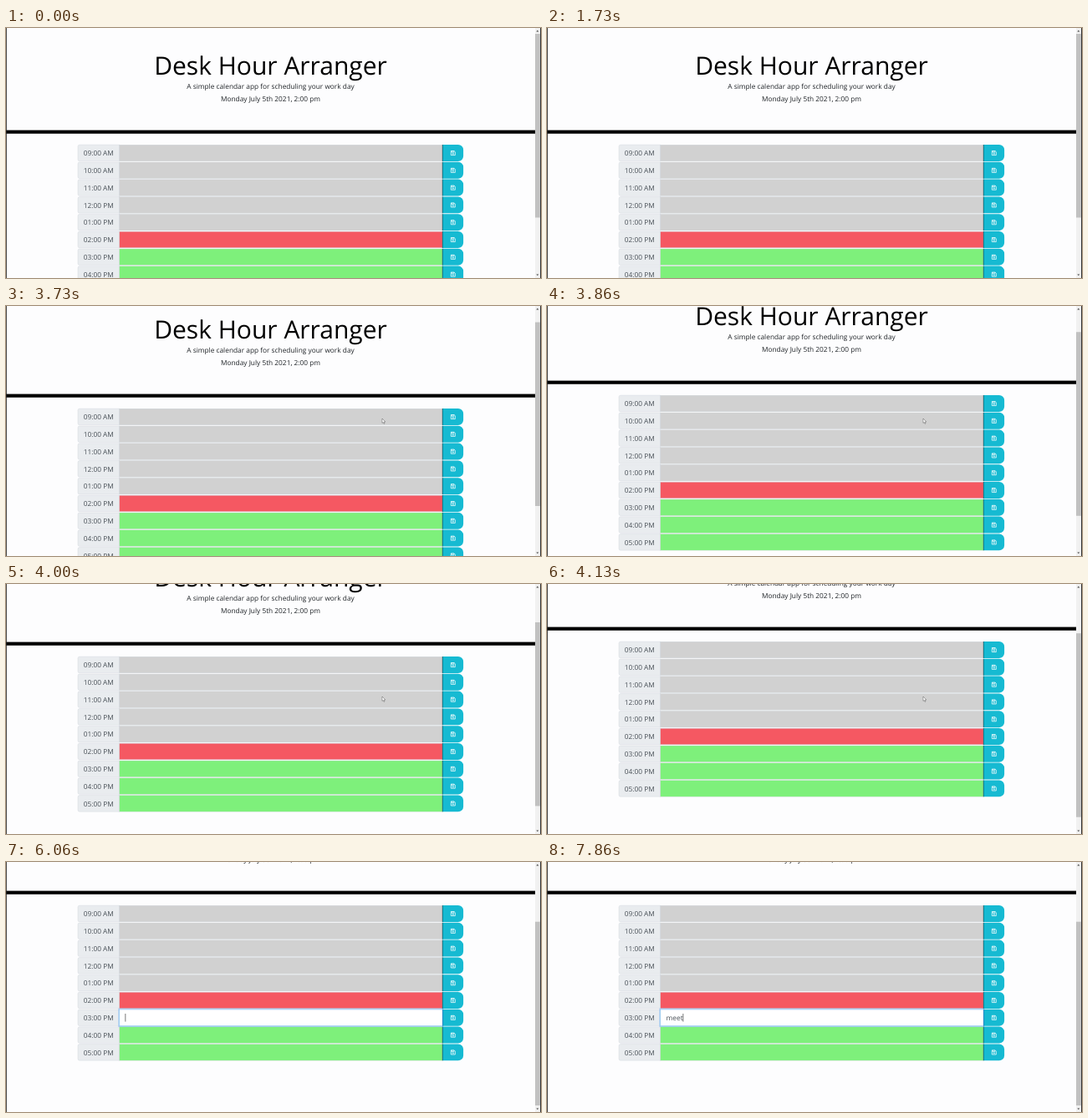
An HTML page that plays this animation: 640 by 300 pixels, repeating every 8 s.

```html
<!DOCTYPE html>
<html lang="en">
<head>
<meta charset="utf-8">
<title>Day planner</title>
<style>
  html, body { margin: 0; width: 100%; height: 100%; overflow: hidden; background: #fdfdfe; }
  svg { display: block; width: 640px; height: 300px; }
  text { font: 8.32px "Open Sans", sans-serif; fill: #212529; text-rendering: geometricPrecision; }
  .middle { text-anchor: middle; }
  .title { font-size: 30px; fill: #000; }
  .entry, .hour { fill: #495057; }
  .label { fill: #e9ecef; }
  .label, .slot { stroke: #ced4da; stroke-width: .42; }
  .past { fill: #d1d1d1; }
  .present { fill: #f55862; }
  .future { fill: #7ef07b; }
  .icon { fill: none; stroke: #fff; stroke-width: .75; }
</style>
</head>
<body>
<svg viewBox="0 0 640 300">
  <g id="page">
    <text class="middle title" x="316.5" y="56">Desk Hour Arranger</text>
    <text class="middle" x="316.5" y="73">A simple calendar app for scheduling your work day</text>
    <text class="middle" x="316.5" y="88">Monday July 5th 2021, 2:00 pm</text>
    <rect y="122.6" width="633" height="4.16"/>
    <g id="rows"></g>
    <g id="focus">
      <rect id="glow" x="134.9" y="264.2" width="387.7" height="21.2" fill="none" stroke="#007bff" stroke-opacity=".25" stroke-width="1.3"/>
      <rect x="135.7" y="265" width="386.3" height="19.6" fill="#fff" stroke="#80bdff" stroke-width=".5"/>
      <text id="entry" class="entry" x="142.6" y="278"></text>
      <rect id="caret" y="270" width=".6" height="9.6" fill="#222"/>
    </g>
  </g>
  <rect x="633" width="7" height="300" fill="#f1f1f1"/>
  <rect id="thumb" x="633" width="5.8" height="220.5" fill="#c1c1c1"/>
  <path d="M634.3 4.4h3l-1.5-1.8zM634.3 295.4h3l-1.5 1.8z" fill="#505050"/>
  <path d="M.4 0v300M639.5 0v300" stroke="#222" stroke-width=".9"/>
  <path id="pointer" d="M450 135v5.4l1.2-1 .9 2 .9-.4-.9-2h1.7z" fill="#fff" stroke="#555" stroke-width=".5"/>
</svg>
<script>
const LOOP = 8000, FRAME = 1000 / 15;
const ROW_TOP = 140, ROW_PITCH = 20.8, ROW_HEIGHT = 19.97;
const SCROLL_START = 3600, SCROLL = [3, 9, 17, 25, 33, 43, 53, 62, 71, 79, 85, 88];
const FOCUS_AT = 5730, KEY_TIMES = [7260, 7400, 7600, 7800], MESSAGE = "meet";
const $ = id => document.getElementById(id);

function rowMarkup(i) {
  const hour = 9 + i;
  const name = String((hour + 11) % 12 + 1).padStart(2, "0") + ":00 " + (hour < 12 ? "AM" : "PM");
  const state = hour < 14 ? "past" : hour === 14 ? "present" : "future";
  const h = ROW_HEIGHT;
  return `<g transform="translate(0 ${ROW_TOP + i * ROW_PITCH})">
    <path class="label" d="M135.6 .2V${h - .2}H88q-2 0-2-2V2.2q0-2 2-2z"/>
    <text class="middle hour" x="110.8" y="13.2">${name}</text>
    <rect class="slot ${state}" x="135.7" y=".2" width="386.3" height="${h - .4}"/>
    <path d="M522 0h18.9a6.2 6.2 0 0 1 6.2 6.2v${h - 12.4}a6.2 6.2 0 0 1-6.2 6.2H522z" fill="#16bad2"/>
    <path d="M522.2 0v${h}" stroke="#000" stroke-width=".45"/>
    <path class="icon" d="M532.3 7.5h3.8l1.2 1.2v3.9h-5zM533.4 7.5v1.7h2.3V7.5"/>
    <circle class="icon" cx="534.8" cy="10.9" r=".6"/>
  </g>`;
}
$("rows").innerHTML = Array.from({ length: 9 }, (_, i) => rowMarkup(i)).join("");

function scrollAt(t) {
  const step = Math.floor((t + 7 - SCROLL_START) / FRAME);
  return t < SCROLL_START ? 0 : SCROLL[Math.min(step, SCROLL.length - 1)];
}

function show(element, visible) {
  element.setAttribute("visibility", visible ? "inherit" : "hidden");
}

function draw(t) {
  const scroll = scrollAt(t);
  $("page").setAttribute("transform", `translate(0 ${-scroll})`);
  $("thumb").setAttribute("y", 7 + scroll * .735);
  show($("pointer"), t >= 3200 && t < 4530);

  show($("focus"), t >= FOCUS_AT);
  $("glow").setAttribute("opacity", Math.max(0, Math.min(1, (t - FOCUS_AT) / 150)));
  const typed = KEY_TIMES.filter(time => t >= time).length;
  const entry = $("entry");
  entry.textContent = MESSAGE.slice(0, typed);
  $("caret").setAttribute("x", 142.6 + (typed ? entry.getComputedTextLength() : 0));
  show($("caret"), t < 6260 || t >= 6860);
}

const start = performance.now();
function tick() {
  draw((performance.now() - start) % LOOP);
  requestAnimationFrame(tick);
}
tick();
</script>
</body>
</html>
```
